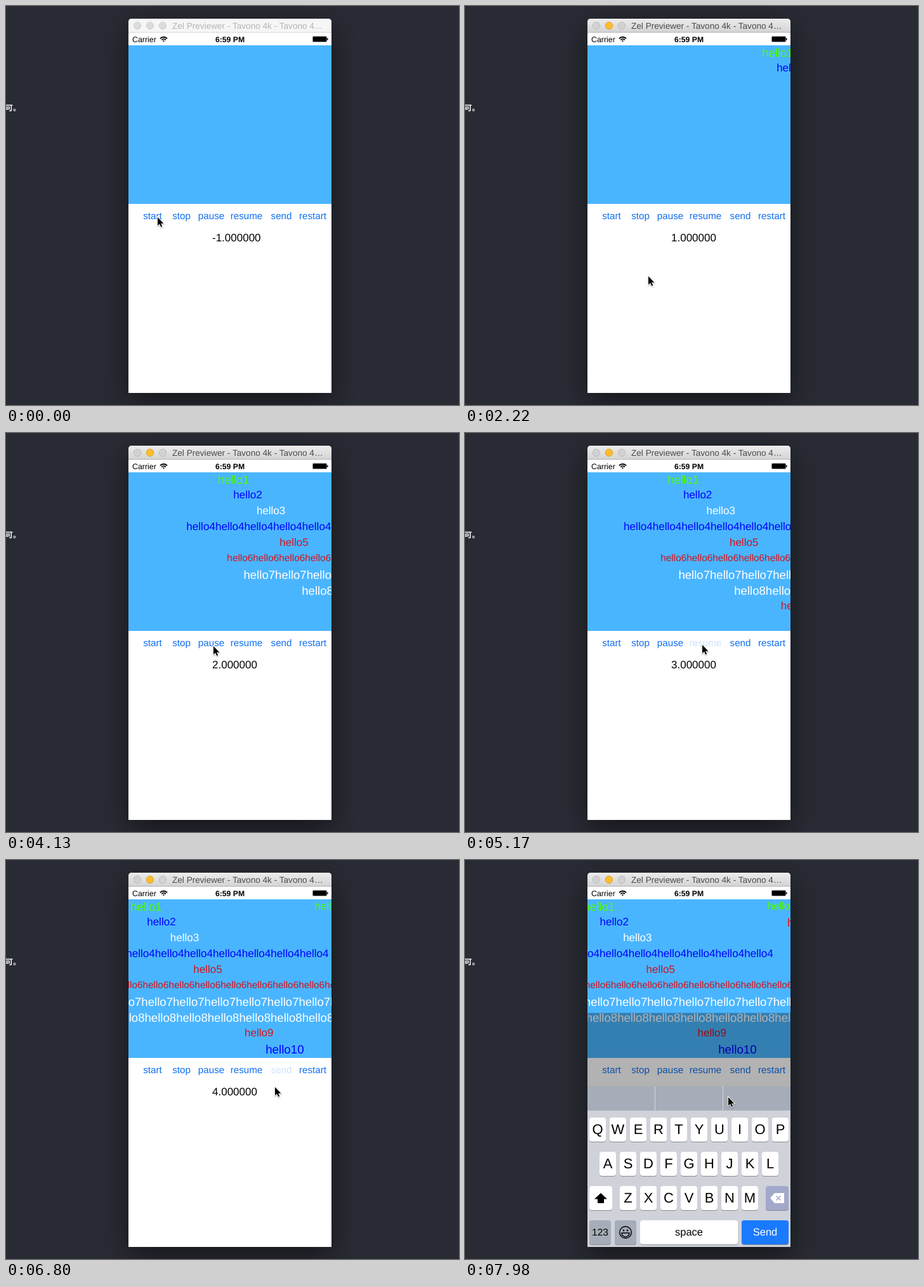
An HTML page with a canvas for the animation above (8 s loop, 714 by 629 pixels).

```html
<!DOCTYPE html>
<html>
<head>
<meta charset="utf-8">
<style>
  html, body { margin: 0; width: 100%; height: 100%; overflow: hidden; background: #292b34; }
  canvas { display: block; }
</style>
</head>
<body>
<canvas id="stage" width="714" height="629"></canvas>
<script>
const ctx = document.getElementById('stage').getContext('2d');
ctx.textRendering = 'geometricPrecision';
const SANS = '"Liberation Sans", Arial, sans-serif';
const LOOP = 8000, STEP = 147.8;
const LEFT = 193, WIDTH = 320, RIGHT = LEFT + WIDTH, TOP = 20, BOTTOM = 610;
const LANES_TOP = 62, LANE = 25, LANES = 10, CROSSING = 4880;
const BLUE = '#0000ff', GREEN = '#4cff00', RED = '#d01420', WHITE = '#ffffff';

// Each comment: start time, font size, colour, repeats of its word
const comments = [
  [1625, 18.5, GREEN, 1], [1925, 17, BLUE, 1], [2413, 17, WHITE, 1],
  [2704, 17.1, BLUE, 12], [2900, 17, RED, 1], [3200, 15.35, RED, 17],
  [3290, 18.6, WHITE, 13], [3776, 18.6, WHITE, 15], [3980, 17, RED, 1],
  [4477, 18.8, BLUE, 1], [5463, 16.6, GREEN, 1], [5872, 18.5, '#f00a14', 1]
].map(([start, size, fill, repeats], i) => ({
  start, size, fill,
  text: `hello${i + 1}`.repeat(repeats),
  y: LANES_TOP + LANE * (i % LANES) + .95 * size
}));

const buttons = { start: 231, stop: 276.5, pause: 323.5, resume: 379, send: 434, restart: 483.5 };
const presses = [['start', 140], ['pause', 4030], ['resume', 5100], ['send', 6340], ['send', 6700]];

// Pointer stops: arrival time, x, y
const stops = [
  [0, 238, 332], [1030, 280, 386], [2217, 288, 425], [3400, 369, 379], [3990, 326, 335],
  [4720, 373, 333], [6207, 434, 337], [6800, 423, 357], [7500, 414, 373]
];

const arrow = new Path2D('M0 0v13.2l3.1-2.8 2.1 4.8 2-.9-2.1-4.6h4.3z');
const shiftIcon = new Path2D('M214 525l10 9.5h-5v6.5h-10v-6.5h-5z');
const deleteIcon = new Path2D('M481 533l7-8h15v16h-15z');
const deleteCross = new Path2D('M490.5 529.5l7 7m0-7l-7 7');
const smile = new Path2D('M247 588h12a6 6 0 0 1-12 0z');

// Playback time: paused in the middle, halted when the input panel opens
const playTime = t => t < 4180 ? t : t < 5170 ? 4180 : Math.min(t - 990, 5937);
const progress = (t, from, to) => Math.min(1, Math.max(0, (t - from) / (to - from)));
const easeOut = k => 1 - (1 - k) ** 3;
const smooth = k => k * k * (3 - 2 * k);

function rect(x, y, w, h, fill, r = 0) {
  ctx.fillStyle = fill;
  ctx.beginPath();
  ctx.roundRect(x, y, w, h, r);
  ctx.fill();
}

function text(s, x, y, size, fill, align = 'left', weight = '') {
  ctx.font = `${weight} ${size}px ${SANS}`;
  ctx.textAlign = align;
  ctx.fillStyle = fill;
  ctx.fillText(s, x, y);
}

function fillPath(path, fill) {
  ctx.fillStyle = fill;
  ctx.fill(path);
}

function strokePath(path, color, width) {
  ctx.strokeStyle = color;
  ctx.lineWidth = width;
  ctx.stroke(path);
}

function arc(x, y, r, from = 0, to = 2 * Math.PI) {
  const path = new Path2D();
  path.arc(x, y, r, from, to);
  return path;
}

function drawDesktop() {
  rect(0, 0, 714, 629, '#292b34');
  ctx.font = 'bold 12px "Noto Sans CJK SC", "Noto Sans CJK", sans-serif';
  ctx.textAlign = 'left';
  ctx.fillStyle = '#fff';
  ctx.fillText('可。', -1, 165);
  ctx.save();
  ctx.shadowColor = 'rgba(0,0,0,.5)';
  ctx.shadowBlur = 46;
  ctx.shadowOffsetY = 14;
  rect(LEFT, TOP, WIDTH, BOTTOM - TOP, '#fff', [5, 5, 0, 0]);
  ctx.restore();
}

function drawTitleBar(active) {
  const shade = ctx.createLinearGradient(0, TOP, 0, 42);
  shade.addColorStop(0, active ? '#ececec' : '#f6f6f6');
  shade.addColorStop(1, active ? '#d3d3d3' : '#f6f6f6');
  rect(LEFT, TOP, WIDTH, 22, shade, [5, 5, 0, 0]);
  rect(LEFT, 41, WIDTH, 1, active ? '#b4b4b4' : '#d8d8d8');
  for (let i = 0; i < 3; i++) {
    const lit = active && i === 1, dot = arc(207 + 20 * i, 31, 5.7);
    fillPath(dot, lit ? '#ffbd2e' : active ? '#d2d2d2' : '#dcdcdc');
    strokePath(dot, lit ? '#dfa023' : active ? '#bbb' : '#d0d0d0', 1);
  }
  text('Zel Previewer - Tavono 4k - Tavono 4…', 262, 36, 13.6, active ? '#4a4a4a' : '#b4b4b4');
}

function drawStatusBar() {
  text('Carrier', 199, 57, 12.4, '#000');
  text('6:59 PM', 353, 57, 12.2, '#000', 'center', 'bold');
  for (const r of [1.3, 4.4, 7.5]) strokePath(arc(248.5, 56.5, r, -2.4, -.74), '#000', 1.8);
  rect(483, 47.5, 23, 9.5, '#777', 2);
  rect(484, 48.5, 21, 7.5, '#000', 1);
  rect(506, 50.5, 1.5, 3.5, '#000', 1);
}

function drawComments(now) {
  rect(LEFT, LANES_TOP, WIDTH, LANE * LANES, '#4ab5ff');
  for (const c of comments) {
    if (now < c.start) continue;
    ctx.font = `${c.size}px ${SANS}`;
    const distance = WIDTH + ctx.measureText(c.text).width;
    text(c.text, RIGHT - distance * (now - c.start) / CROSSING, c.y, c.size, c.fill);
  }
}

function drawControls(t, now) {
  for (const [label, x] of Object.entries(buttons)) {
    const down = presses.some(([name, at]) => name === label && t >= at && t < at + 200);
    text(label, x, 336, 15.2, down ? '#cfe3fc' : '#1270f0', 'center');
  }
  const count = Math.max(-1, Math.floor((now - 180) / 1000) - 1);
  text(count.toFixed(6), 325, 371, 17, '#000');
}

function key(x, y, w, label, fill = '#fff', size = 22, ink = '#000') {
  rect(x, y + 1, w, 38, '#898c92', 4);
  rect(x, y, w, 38, fill, 4);
  text(label, x + w / 2, y + 18.5 + size * .34, size, ink, 'center');
}

function drawKeyboard() {
  const grey = '#a6adb8', lilac = '#a2a8c9';
  rect(LEFT, 357, WIDTH, BOTTOM - 357, '#cfd2d9');
  rect(LEFT, 357, WIDTH, 38, grey);
  for (const x of [299, 406]) rect(x, 357, 1, 38, '#d3d6dc');

  ['QWERTYUIOP', 'ASDFGHJKL', 'ZXCVBNM'].forEach((letters, row) => {
    const x = 356 - 16 * letters.length;
    [...letters].forEach((c, i) => key(x + 32 * i, 406 + 54 * row, 26, c));
  });

  key(196, 514, 36, '');
  fillPath(shiftIcon, '#000');
  key(474, 514, 36, '', lilac);
  fillPath(deleteIcon, '#fff');
  strokePath(deleteCross, lilac, 1.5);

  key(196, 568, 34, '123', grey, 15.5);
  key(236, 568, 34, '', grey);
  strokePath(arc(253, 587, 9.3), '#000', 1.4);
  for (const x of [250, 256]) fillPath(arc(x, 584, 1.4), '#000');
  strokePath(smile, '#000', 1.4);
  key(276, 568, 154, 'space', '#fff', 16.5);
  key(436, 568, 74, 'Send', '#1a7aff', 16.5, '#fff');
}

// The pointer rests at each stop, then glides to the next just before its arrival time
function pointerAt(t) {
  let [, x, y] = stops[0];
  for (let i = 1; i < stops.length; i++) {
    const [arrive, nx, ny] = stops[i];
    const k = smooth(progress(t, Math.max(stops[i - 1][0], arrive - 600), arrive));
    x += (nx - x) * k;
    y += (ny - y) * k;
  }
  return [x, y];
}

function drawPointer(t) {
  const [x, y] = pointerAt(t);
  ctx.save();
  ctx.translate(x + 1, y + 1);
  ctx.shadowColor = 'rgba(0,0,0,.35)';
  ctx.shadowBlur = 2;
  ctx.shadowOffsetY = 1;
  strokePath(arrow, '#fff', 1.8);
  ctx.shadowColor = 'transparent';
  fillPath(arrow, '#000');
  ctx.restore();
}

function draw(t) {
  const now = playTime(t);
  drawDesktop();
  drawTitleBar(t >= 140);
  drawStatusBar();
  ctx.save();
  ctx.beginPath();
  ctx.rect(LEFT, LANES_TOP, WIDTH, BOTTOM - LANES_TOP);
  ctx.clip();
  drawComments(now);
  drawControls(t, now);
  const shade = 369 * easeOut(progress(t, 7300, 7950));
  rect(LEFT, BOTTOM - shade, WIDTH, shade, 'rgba(0,0,0,.3)');
  ctx.translate(0, 253 * (1 - easeOut(progress(t, 7300, 7900))));
  drawKeyboard();
  ctx.restore();
  drawPointer(t);
}

function tick() {
  const t = performance.now() % LOOP;
  draw(Math.floor((t + 5) / STEP) * STEP);
  requestAnimationFrame(tick);
}
tick();
</script>
</body>
</html>
```
